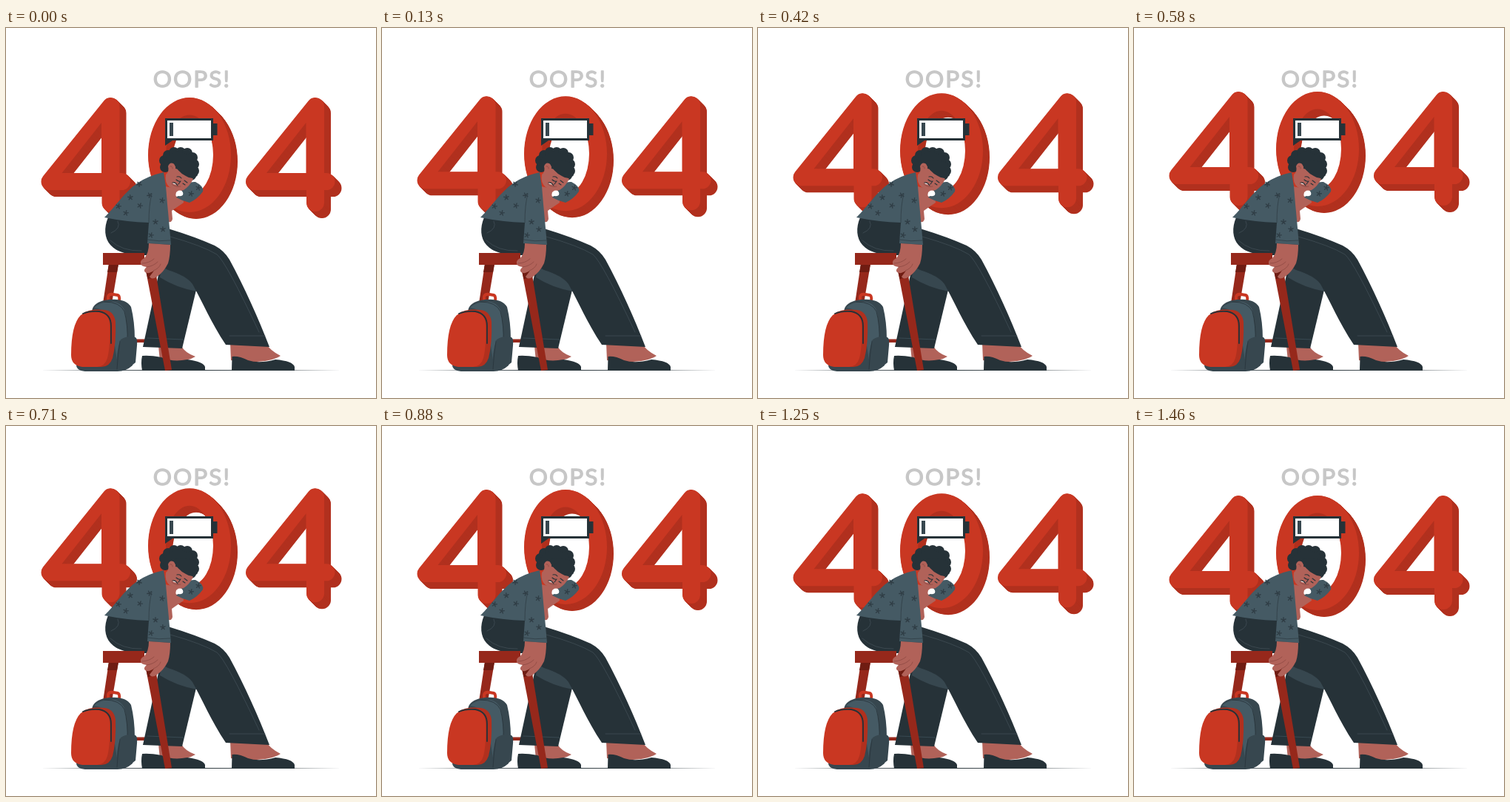
Write an HTML page with a canvas that moves like this. It is 500 px wide and 500 px high and loops after 1500 ms.

```html
<!DOCTYPE html>
<html lang="en">
<head>
<meta charset="utf-8">
<title>404</title>
<style>
html, body { margin: 0; width: 100%; height: 100%; overflow: hidden; background: #fff; }
canvas { display: block; width: 500px; height: 500px; }
</style>
</head>
<body>
<canvas id="stage"></canvas>
<script>
const canvas = document.getElementById('stage');
const ctx = canvas.getContext('2d');
const ratio = window.devicePixelRatio || 1;
canvas.width = canvas.height = 500 * ratio;

const LOOP = 1500, STEPS = 36, RISE = 10, DEPTH = 9;
const RED = '#c93722', RED_SIDE = '#b1301e', WOOD = '#96281b', WOOD_SHADE = '#6f1c12';
const INK = '#263238', SLATE = '#37474f', KNIT = '#455a64', SKIN = '#b16259', SKIN_SHADE = '#8f4a43';

function fill(color, path) {
  ctx.fillStyle = color;
  ctx.fill(new Path2D(path));
}

function line(color, width, path) {
  ctx.strokeStyle = color;
  ctx.lineWidth = width;
  ctx.stroke(new Path2D(path));
}

function dots(color, radius, points) {
  ctx.fillStyle = color;
  for (const [x, y] of points) {
    ctx.beginPath();
    ctx.arc(x, y, radius, 0, 7);
    ctx.fill();
  }
}

function fourShape() {
  const p = new Path2D(), tilt = -2.46;
  p.arc(418, 106, 12, tilt, 0);
  p.lineTo(430, 196);
  p.arc(433, 207.5, 11.5, -Math.PI / 2, Math.PI / 2);
  p.lineTo(430, 219);
  p.arc(418, 236, 12, 0, Math.PI);
  p.lineTo(406, 219);
  p.arc(335.5, 207.5, 11.5, Math.PI / 2, tilt + 2 * Math.PI);
  p.closePath();
  p.addPath(new Path2D('M352 196L405.5 128V196Z'));
  return p;
}

function zeroShape() {
  const p = new Path2D();
  p.ellipse(248, 171.5, 56, 77.5, 0, 0, 2 * Math.PI);
  p.closePath();
  p.moveTo(280, 171.5);
  p.ellipse(248, 171.5, 32, 54, 0, 0, 2 * Math.PI);
  return p;
}

const four = fourShape(), zero = zeroShape();

function extrude(shape, x, y) {
  for (let d = DEPTH; d >= 0; d -= 0.5) {
    ctx.save();
    ctx.translate(x + d, y + d);
    ctx.fillStyle = d ? RED_SIDE : RED;
    ctx.fill(shape, 'evenodd');
    ctx.restore();
  }
}

function drawTitle() {
  ctx.font = '400 31.5px Lato, sans-serif';
  ctx.letterSpacing = '2.1px';
  ctx.fillStyle = ctx.strokeStyle = '#c7c7c7';
  ctx.lineWidth = 1.3;
  ctx.fillText('OOPS!', 198.7, 80.3);
  ctx.strokeText('OOPS!', 198.7, 80.3);
  ctx.letterSpacing = '0px';
}

function drawBattery() {
  fill(INK, 'M215 122H280V129H285.5V145H280V152H225L215 159Z');
  fill('#fff', 'M218 125H277V149H218Z');
  fill(SLATE, 'M221 128H226V146H221Z');
}

function drawStool() {
  fill(WOOD, 'M139 319H152L143 372H131Z');
  fill(WOOD_SHADE, 'M139 319H152L150 330H137Z');
  fill(WOOD, 'M172 420.5H216V425H172Z');
}

function drawLegs() {
  fill(SKIN, 'M206 430H237Q242 439 256 444Q242 453 208 450Z');
  fill(INK, 'M184 443Q194 442 210 445Q225 452 245 448Q267 451 269 458V463H184Q182 452 184 443Z');
  fill(INK, 'M207 329L185 431L238 433L257 354Z');
  fill(SLATE, 'M210 322Q236 330 256 346L258 356Q230 351 208 337Z');
  line('#455a64', 0.6, 'M191 419L240 421');

  fill(SKIN, 'M303 425H350Q357 436 371 443Q352 455 304 449Z');
  fill(INK, 'M305.5 444Q315 443 327 449Q342 454 364 448Q388 450 390 458V463H305Z');
  fill(INK, 'M138 256C132 270 133 284 141 293C150 303 164 307 190 307Q204 320 219 327Q244 335 252 346C266 371 277 398 297 428L356 431C341 392 322 350 302 313Q295 301 282 294Q255 282 222 272L195 260Z');
  line('#49575e', 0.6, 'M302 416L350 416M222 282Q265 294 285 306Q298 317 342 411M141 287Q157 302 183 301M151 261Q156 271 142 277');
}

function drawFrontLeg() {
  fill(WOOD, 'M131 304H187V320H131Z');
  fill(WOOD, 'M189 328H202L224 462L215 463Z');
  fill(WOOD_SHADE, 'M189 328H202L203.5 337L191.5 339Z');
}

function drawBackpack() {
  line(RED, 4, 'M138 369V363Q139 359 145 360L151 361Q154 362 153 369');
  fill(SLATE, 'M117 379Q121 369 139 367Q162 365 169 377Q174 397 174 421L171 456Q161 465 148 464H110Q96 464 95 456Z');
  fill(KNIT, 'M119 378Q128 369 144 370Q157 371 161 384Q165 409 164 429L151 455L141 391Q133 380 119 378Z');
  line(INK, 0.8, 'M133 370Q154 370 160 383Q165 402 164 424');
  fill(SLATE, 'M155 421Q164 415 175 418Q178 420 177 429L175 452Q163 463 150 463Q148 438 155 421Z');
  line(INK, 0.7, 'M154 423Q151 441 150 461');
  fill(RED_SIDE, 'M103 386Q114 379 134 381Q146 383 148 397Q149 427 144 446Q140 458 129 458L105 458Z');
  fill(RED, 'M101 388Q110 382 126 383Q140 385 140 402Q141 431 137 446Q134 457 123 458H103Q88 456 88 442Q88 401 101 388Z');
  line(INK, 1.8, 'M104 386Q113 382 126 383Q142 386 142 403V426');
}

function drawStars(points) {
  ctx.strokeStyle = '#303e46';
  ctx.lineWidth = 1.4;
  for (const [x, y] of points) {
    ctx.beginPath();
    for (let i = 0; i < 5; i++) {
      const a = i * Math.PI * 0.4 + x;
      ctx.moveTo(x, y);
      ctx.lineTo(x + 3.3 * Math.cos(a), y + 3.3 * Math.sin(a));
    }
    ctx.stroke();
  }
}

function drawBody() {
  fill(SKIN, 'M215 214L238 219L240 236Q231 242 224 247L225 258Q224 263 220 262L214 240Z');
  fill(KNIT, 'M239 216Q246 207 256 208Q268 214 266 221Q259 231 248 236Q239 234 230 229Q237 222 239 216Z');
  fill('#fff', 'M230 222Q236 216 239 222Q241 228 233 227Q228 230 230 222Z');
  fill(KNIT, 'M213 195Q191 200 177 210C160 222 148 241 133 256Q162 262 193 263L191 291L223 293Q220 258 218 238L216 214Z');
  line('#303e46', 0.8, 'M193 263Q193 239 197 224M191 286Q207 289 222 287');
  drawStars([[180, 211], [168, 229], [194, 226], [152, 241], [162, 250], [181, 240], [211, 233],
    [202, 262], [212, 272], [196, 280], [250, 224], [260, 216]]);
  fill(SKIN, 'M193 291L222 293Q222 308 219 318Q213 330 204 336Q197 341 194 336L200 328Q192 333 188 330Q185 327 190 323Q182 322 182 318Q181 314 187 311Q193 304 193 291Z');
  line(SKIN_SHADE, 0.8, 'M184 318Q193 318 200 312M190 323Q199 322 205 316M199 328Q207 325 209 319');
}

function drawHead() {
  dots(INK, 7, [[215, 188], [214, 179], [219, 172], [227, 168], [236, 168], [245, 169],
    [252, 175], [254, 184], [254, 193], [250, 199]]);
  fill(INK, 'M214 178L230 166L250 172L257 190L248 204L226 196L214 193Z');
  fill(SKIN, 'M219 187Q221 181 226 183Q230 186 229 190Q239 191 253 204Q248 214 240 219Q231 221 221 215Q214 209 216 198Q221 194 219 187Z');
  fill(INK, 'M226 181Q231 194 243 200Q252 206 259 199L256 183Q239 175 226 181Z');
  line(INK, 1.1, 'M231 201Q235 200 237 203M241 206L245 209M230 205Q233 208 236 207M239 210L242 212M225 209Q229 208 232 213M236 207L233 211');
  line(SKIN_SHADE, 0.8, 'M222 187Q225 186 225 190M224 211Q230 216 236 214');
  line('#fff', 1, 'M226 210L229 211');
}

function drawScene(now) {
  const step = Math.floor((now % LOOP) * STEPS / LOOP + 0.1) % STEPS;
  const phase = step / (STEPS - 1);
  const lift = -RISE * (1 - Math.abs(2 * phase - 1));
  ctx.setTransform(ratio, 0, 0, ratio, 0, 0);
  ctx.fillStyle = '#fff';
  ctx.fillRect(0, 0, 500, 500);
  ctx.lineCap = ctx.lineJoin = 'round';
  drawTitle();
  extrude(four, -276.5, lift);
  extrude(zero, 0, lift);
  extrude(four, 0, lift);
  drawBattery();
  fill(INK, 'M47 462.5Q250 461.4 453 462.5Q250 463.6 47 462.5Z');
  drawStool();
  drawLegs();
  drawFrontLeg();
  drawBackpack();
  drawBody();
  drawHead();
}

const start = performance.now();
function tick() {
  drawScene(performance.now() - start);
  requestAnimationFrame(tick);
}
tick();
</script>
</body>
</html>
```
